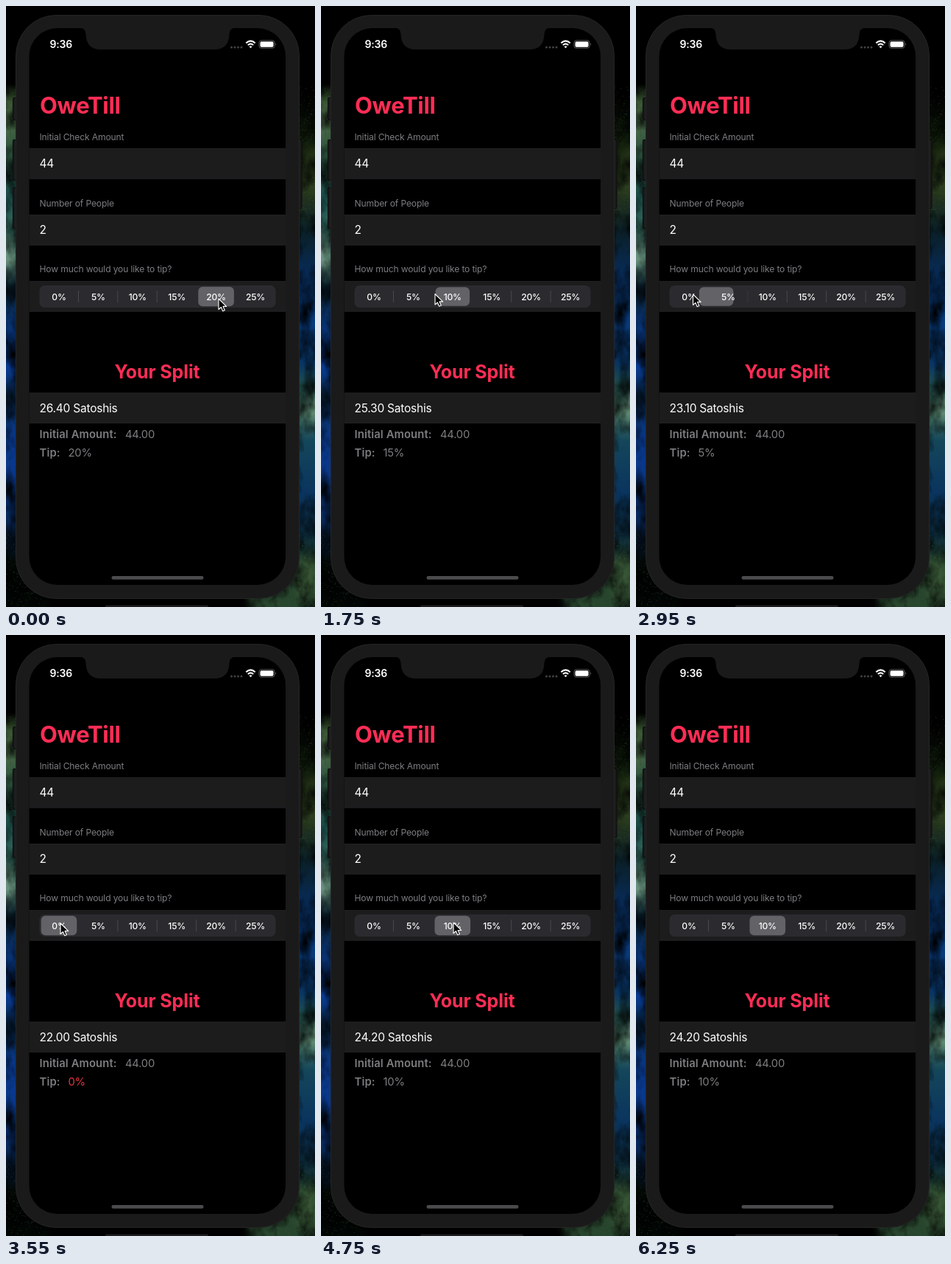
Recreate the animation shown at these times as an HTML page. Size 420 by 815 pixels, loop 6.3 s.

```html
<!DOCTYPE html>
<html lang="en">
<head>
<meta charset="utf-8">
<title>Tip calculator</title>
<style>
  html, body { margin: 0; width: 100%; height: 100%; overflow: hidden; background: #000; }
  svg { display: block; width: 420px; height: 815px; }
  text { font-family: Inter, "Liberation Sans", sans-serif; fill: #fff; letter-spacing: -.015em; white-space: pre; }
  .title { font-size: 31px; font-weight: 700; fill: #ff2d55; letter-spacing: -.01em; }
  .heading { font-size: 25px; font-weight: 700; fill: #ff2d55; letter-spacing: -.005em; text-anchor: middle; }
  .label { font-size: 12.1px; fill: #7d7d82; letter-spacing: -.012em; }
  .value { font-size: 15.5px; }
  .detail { font-size: 14.8px; fill: #7d7d80; }
  .strong { font-weight: 600; letter-spacing: .008em; }
  .clock { font-size: 14px; font-weight: 600; }
  .option { font-size: 12.1px; font-weight: 500; text-anchor: middle; }
</style>
</head>
<body>
<svg viewBox="0 0 420 815" xmlns="http://www.w3.org/2000/svg">
  <defs>
    <linearGradient id="leftSky" x1="0" y1="0" x2="0" y2="1"></linearGradient>
    <linearGradient id="rightSky" x1="0" y1="0" x2="0" y2="1"></linearGradient>
    <filter id="soft" x="-50%" y="-50%" width="200%" height="200%"><feGaussianBlur stdDeviation="7"/></filter>
    <filter id="clouds" x="0" y="0" width="100%" height="100%">
      <feTurbulence type="fractalNoise" baseFrequency=".04 .025" numOctaves="4" seed="5"/>
      <feColorMatrix values="0 0 0 0 0  0 0 0 0 0  0 0 0 0 0  2 0 0 0 -.75"/>
    </filter>
  </defs>

  <rect width="420" height="815" fill="#000"/>
  <rect width="210" height="815" fill="url(#leftSky)"/>
  <rect x="210" width="210" height="815" fill="url(#rightSky)"/>
  <g filter="url(#soft)">
    <ellipse cx="1" cy="155" rx="6" ry="26" fill="#5f8459" opacity=".5"/>
    <ellipse cx="0" cy="333" rx="9" ry="22" fill="#8db19a" opacity=".5"/>
    <ellipse cx="420" cy="225" rx="9" ry="30" fill="#40572a" opacity=".5"/>
    <ellipse cx="420" cy="545" rx="9" ry="20" fill="#86aa8c" opacity=".5"/>
    <ellipse cx="410" cy="775" rx="16" ry="30" fill="#46663d" opacity=".6"/>
    <rect x="60" y="790" width="270" height="45" fill="#000"/>
  </g>
  <rect width="420" height="815" filter="url(#clouds)"/>
  <path id="dust" stroke="#56774a" stroke-width=".8" opacity=".5"/>
  <rect x="135" y="812.5" width="140" height="4" rx="2" fill="#1d1d1f"/>

  <g fill="#1b1b1c" stroke="#0a0a0a">
    <rect x="9.5" y="124.5" width="8" height="30" rx="1.5"/>
    <rect x="9.5" y="181.5" width="8" height="55" rx="1.5"/>
    <rect x="9.5" y="246.5" width="8" height="55" rx="1.5"/>
    <rect x="394.5" y="181.5" width="7.5" height="93" rx="1.5"/>
  </g>
  <rect x="13.5" y="12.5" width="385" height="791" rx="55" fill="#1a1a1a" stroke="#252525"/>
  <rect x="31.5" y="30" width="348.5" height="755" rx="38" fill="#000"/>
  <path d="M100 29.5Q108.5 30 108.5 38Q109 59 129 59H283Q303 59 303.5 38Q303.5 30 312 29.5Z" fill="#1a1a1a"/>

  <text class="clock" x="59.5" y="57">9:36</text>
  <g fill="#434346">
    <circle cx="306.5" cy="56" r="1.5"/><circle cx="311" cy="56" r="1.5"/>
    <circle cx="315.5" cy="56" r="1.5"/><circle cx="320" cy="56" r="1.5"/>
  </g>
  <g fill="none" stroke="#fff" stroke-width="2">
    <path d="M326.3 50.2Q332.5 44.6 338.7 50.2M328.8 53Q332.5 49.7 336.2 53"/>
    <path d="M330.5 55L332.5 57.2L334.5 55Q332.5 53.3 330.5 55Z" fill="#fff" stroke="none"/>
  </g>
  <rect x="344" y="46.8" width="21" height="10.4" rx="3" fill="none" stroke="#5c5c5e"/>
  <rect x="345.5" y="48.2" width="18" height="7.6" rx="1.7" fill="#fff"/>
  <path d="M366.3 50.3Q368.2 52 366.3 53.8Z" fill="#5c5c5e"/>

  <text class="title" x="46" y="146">OweTill</text>
  <g id="rows"></g>
  <text class="label" x="45.5" y="181.5">Initial Check Amount</text>
  <text class="value" x="45.5" y="218.7">44</text>
  <text class="label" x="45.5" y="271.5">Number of People</text>
  <text class="value" x="45.5" y="308.7">2</text>
  <text class="label" x="45.5" y="361.3">How much would you like to tip?</text>

  <rect x="45.5" y="379" width="321" height="30" rx="7" fill="#2b2b2f"/>
  <g id="dividers"></g>
  <rect id="pill" rx="6" fill="#626267"/>
  <g id="options"></g>

  <text class="heading" x="205.5" y="505">Your Split</text>
  <text class="value" id="total" x="45.5" y="551.2"></text>
  <text class="detail strong" x="45.5" y="585.7">Initial Amount:</text>
  <text class="detail" x="162" y="585.7">44.00</text>
  <text class="detail strong" x="45.5" y="611.3">Tip:</text>
  <text class="detail" id="tip" x="84.5" y="611.3"></text>

  <rect x="143.5" y="773" width="125" height="4.7" rx="2.3" fill="#4b4b4e"/>
  <path id="cursor" d="M0 0V14.5L3.4 11.4L5.7 16.7L8.3 15.5L6 10.4H10.6Z"
        fill="#000" stroke="#fff" stroke-width="1.1" stroke-linejoin="round"/>
</svg>
<script>
const LOOP = 6300, STEP = 50;
const MOVE_TIME = 300, COMMIT_DELAY = 420;
const tips = [0, 5, 10, 15, 20, 25];
const moves = [
  { at: 520, to: 3 }, { at: 1400, to: 2 }, { at: 2050, to: 1 },
  { at: 2840, to: 0 }, { at: 4050, to: 2 }
];
// time, x, y of the pointer tip
const pointer = [
  [0, 289, 397], [300, 287, 396], [600, 228, 396], [1050, 208, 396], [1300, 197, 394],
  [1550, 158, 391], [1750, 155, 390.5], [2000, 146, 391], [2250, 107, 391], [2650, 102, 391],
  [2950, 77.5, 391], [3600, 74, 391], [4000, 170, 390], [4150, 174, 390],
  [4600, 180, 390], [5500, 181, 391], [5850, 245, 14]
];
const POINTER_HIDES = 5900;

const $ = id => document.getElementById(id);
const clamp = v => Math.max(0, Math.min(1, v));
const ease = v => { v = clamp(v); return v * v * (3 - 2 * v); };
const mix = (a, b, k) => a + (b - a) * k;
const center = i => 72 + 53.4 * i;

function add(parent, tag, attrs, text = "") {
  const node = document.createElementNS("http://www.w3.org/2000/svg", tag);
  for (const name in attrs) node.setAttribute(name, attrs[name]);
  node.textContent = text;
  parent.append(node);
  return node;
}

function addSky(id, stops) {
  for (const [y, color] of stops) add($(id), "stop", { offset: y / 815, "stop-color": color });
}
addSky("leftSky", [
  [105, "#000"], [130, "#35502f"], [170, "#3c5c40"], [215, "#27513f"], [260, "#1a4a47"],
  [305, "#356b60"], [345, "#567f6c"], [380, "#0a2230"], [430, "#08306c"], [490, "#083a92"],
  [530, "#08294a"], [590, "#0a3a90"], [670, "#09347f"], [715, "#061c38"], [755, "#020704"]
]);
addSky("rightSky", [
  [115, "#000"], [170, "#0b1508"], [215, "#202f16"], [255, "#25351d"], [305, "#0a1f26"],
  [360, "#082a54"], [425, "#083a7c"], [485, "#093462"], [515, "#20504e"], [550, "#4c7864"],
  [590, "#14465a"], [660, "#0a345e"], [715, "#0b2a3c"], [755, "#1f3b28"], [800, "#28452e"]
]);

let seed = 17;
const random = () => (seed = seed * 16807 % 2147483647) / 2147483647;
let specks = "";
for (let i = 0; i < 900; i++) {
  const x = random() < .5 ? random() * 50 : 420 - random() * 60;
  const y = random() < .4 ? 715 + random() * 100 : 110 + random() * 180;
  specks += `M${x.toFixed(1)} ${y.toFixed(1)}h.8`;
}
$("dust").setAttribute("d", specks);

for (const y of [193, 283, 373, 524.5]) {
  add($("rows"), "rect", { x: 31.5, y, width: 348.5, height: 41.5, fill: "#1c1c1d" });
  add($("rows"), "path", { d: `M31.5 ${y + .4}h348.5m0 40.7h-348.5`, stroke: "#252527", "stroke-width": .8, fill: "none" });
}
tips.forEach((tip, i) => add($("options"), "text", { class: "option", x: center(i), y: 398.5 }, tip + "%"));
const dividers = tips.slice(1).map((_, i) => {
  const x = center(i) + 26.5;
  return { x, node: add($("dividers"), "rect", { x: x - .5, y: 386, width: 1, height: 16, fill: "#48484d" }) };
});

function selection(t) {
  let x = center(4), chosen = 4, press = 0;
  for (const { at, to } of moves) {
    x = mix(x, center(to), ease((t - at) / MOVE_TIME));
    if (t >= at + COMMIT_DELAY) chosen = to;
    press += ease((t - at + 50) / 150) - ease((t - at - COMMIT_DELAY) / 100);
  }
  return { x, chosen, press };
}

function pointerAt(t) {
  const next = pointer.findIndex(key => key[0] > t);
  if (next < 0) return pointer[pointer.length - 1].slice(1);
  const [t0, x0, y0] = pointer[next - 1], [t1, x1, y1] = pointer[next];
  const k = ease((t - t0) / (t1 - t0));
  return [mix(x0, x1, k), mix(y0, y1, k)];
}

function draw(t) {
  const { x, chosen, press } = selection(t);
  const width = mix(48.6, 46.5, press), height = mix(26.4, 25.3, press);
  const pill = { x: x - width / 2, y: 394 - height / 2, width, height };
  for (const name in pill) $("pill").setAttribute(name, pill[name]);
  for (const { x: dx, node } of dividers) node.setAttribute("opacity", clamp((Math.abs(dx - x) - 34) / 18));

  const tip = tips[chosen];
  $("total").textContent = (44 * (1 + tip / 100) / 2).toFixed(2) + " Satoshis";
  $("tip").textContent = tip + "%";
  $("tip").style.fill = tip ? "" : "#e5343d";

  $("cursor").setAttribute("transform", `translate(${pointerAt(t)})`);
  $("cursor").setAttribute("visibility", t < POINTER_HIDES ? "visible" : "hidden");
}

const start = performance.now();
function tick() {
  const t = (performance.now() - start) % LOOP;
  draw(Math.floor(t / STEP) * STEP);
  requestAnimationFrame(tick);
}
tick();
</script>
</body>
</html>
```
